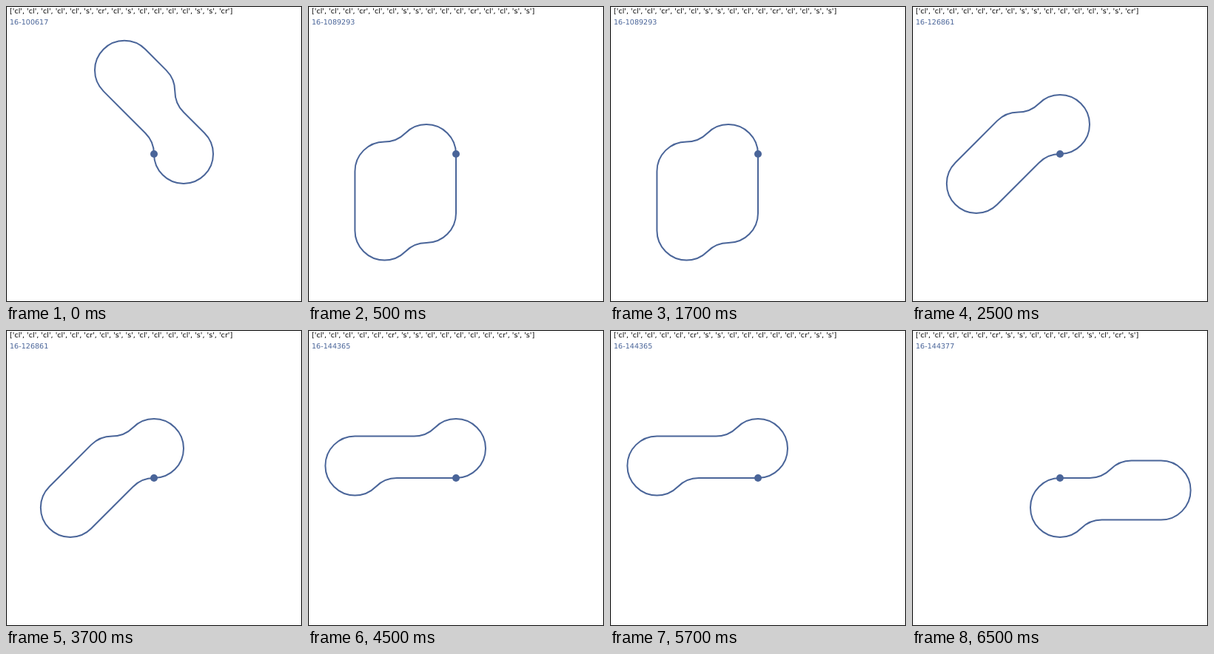
Recreate the animation shown at these times as an HTML page with a canvas. Size 400 by 400 pixels, loop 8 s.

```html
<!DOCTYPE html>
<html lang="en">
<head>
<meta charset="utf-8">
<title>Closed tracks</title>
<style>
  html, body { margin: 0; width: 100%; height: 100%; overflow: hidden; background: #fff; }
  canvas { display: block; width: 400px; height: 400px; }
</style>
</head>
<body>
<canvas id="stage" width="400" height="400"></canvas>
<script>
const ctx = document.getElementById('stage').getContext('2d');
const LOOP = 8000, UNIT = 40, BLUE = '#4a6599';
const RIGHT = 0, DOWN = Math.PI / 2, LEFT = Math.PI, UP = -Math.PI / 2;

// Each track starts at the centre of the stage with the given heading.
const tracks = [
  { from: 0, id: '16-100617', heading: DOWN, parts: 'cl cl cl cl cl s cr cl s cl cl cl cl s s cr' },
  { from: 500, id: '16-1089293', heading: UP, parts: 'cl cl cl cr cl cl s s cl cl cl cr cl cl s s' },
  { from: 2500, id: '16-126861', heading: RIGHT, parts: 'cl cl cl cl cl cr cl s s cl cl cl cl s s cr' },
  { from: 4500, id: '16-144365', heading: RIGHT, parts: 'cl cl cl cl cl cr s s cl cl cl cl cl cr s s' },
  { from: 6500, id: '16-144377', heading: LEFT, parts: 'cl cl cl cl cl cr s s cl cl cl cl s cl cr s' }
];

function label(text, baseline, color) {
  ctx.fillStyle = color;
  ctx.fillText(text, 5, baseline);
}

function tracePath(parts, heading) {
  let x = 200, y = 200;
  ctx.beginPath();
  ctx.moveTo(x, y);
  for (const part of parts) {
    if (part === 's') {
      x += UNIT * Math.cos(heading);
      y += UNIT * Math.sin(heading);
      ctx.lineTo(x, y);
      continue;
    }
    // An eighth of a circle, turning left (-1) or right (+1).
    const turn = part === 'cl' ? -1 : 1;
    const side = turn * Math.PI / 2;
    const cx = x + UNIT * Math.cos(heading + side);
    const cy = y + UNIT * Math.sin(heading + side);
    const next = heading + turn * Math.PI / 4;
    ctx.arc(cx, cy, UNIT, heading - side, next - side, turn < 0);
    x = cx + UNIT * Math.cos(next - side);
    y = cy + UNIT * Math.sin(next - side);
    heading = next;
  }
  ctx.stroke();
}

function draw({ id, heading, parts }) {
  const list = parts.split(' ');
  ctx.fillStyle = '#fff';
  ctx.fillRect(0, 0, 400, 400);

  ctx.strokeStyle = BLUE;
  ctx.lineWidth = 2;
  ctx.lineJoin = 'round';
  tracePath(list, heading);

  ctx.fillStyle = BLUE;
  ctx.beginPath();
  ctx.arc(200, 200, 5, 0, 2 * Math.PI);
  ctx.fill();

  ctx.font = '9.6px "DejaVu Sans", sans-serif';
  ctx.textRendering = 'geometricPrecision';
  label('[' + list.map(p => `'${p}'`).join(', ') + ']', 10, '#000');
  label(id, 25, BLUE);

  ctx.strokeStyle = '#000';
  ctx.lineWidth = 1;
  ctx.strokeRect(0.5, 0.5, 399, 399);
}

const start = performance.now();
function tick() {
  const t = (performance.now() - start) % LOOP;
  draw(tracks.filter(track => track.from <= t).pop());
  requestAnimationFrame(tick);
}
tick();
</script>
</body>
</html>
```
